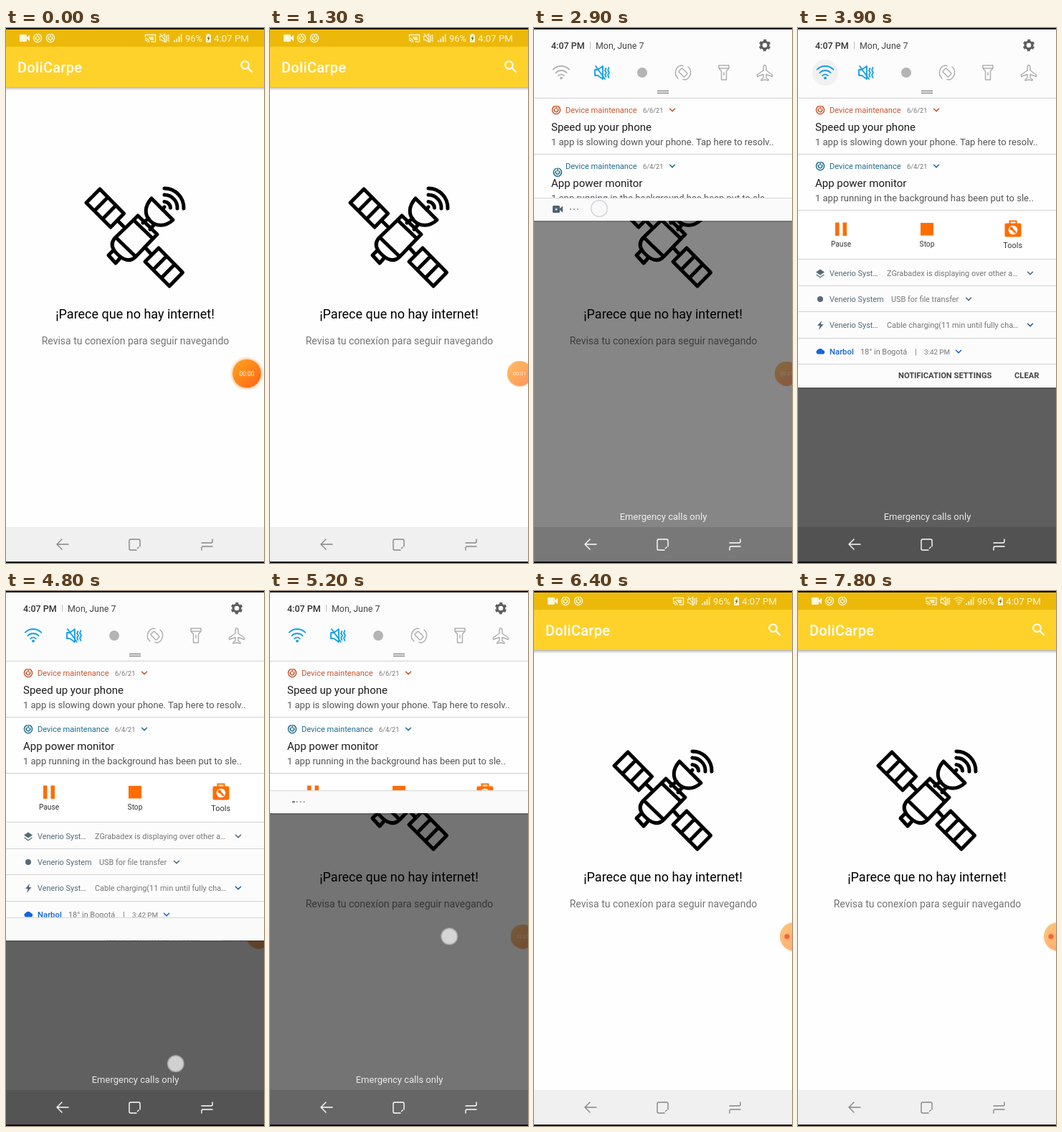
An HTML page for the animation above (8 s loop, 360 by 744 pixels).

```html
<!DOCTYPE html>
<html lang="es">
<head>
<meta charset="utf-8">
<title>Sin internet</title>
<style>
@property --h { syntax: '<number>'; inherits: true; initial-value: 0; }

html, body { margin: 0; width: 100%; height: 100%; overflow: hidden; background: #000; }
#stage {
  position: relative; width: 360px; height: 744px; overflow: hidden; background: #fefefe;
  font-family: Roboto, 'Open Sans', sans-serif;
  animation: pull 8s linear infinite;
  --dim: clamp(0, min((var(--h) - 100) * .0028, .407 + var(--h) * .000447), 1);
  --cam: clamp(0, (322 - var(--h)) / 50, 1);
  --blue: clamp(0, (250 - var(--h)) / 50, 1);
  --red: clamp(0, (150 - var(--h)) / 50, 1);
}
svg { position: absolute; left: 0; top: 0; display: block; }
.line { fill: none; stroke: currentColor; stroke-linecap: round; stroke-linejoin: round; }
.mid { text-anchor: middle; }
.md { font-weight: 500; }

/* height of the notification panel drives everything tied to it */
@keyframes pull {
  0%, 33.1% { --h: 0; }
  33.75% { --h: 40; }
  35% { --h: 150; }
  36.25% { --h: 267; }
  37.5% { --h: 370; }
  38.75% { --h: 450; }
  41.25%, 59.4% { --h: 499.5; }
  62.5% { --h: 430; }
  63.75% { --h: 375; }
  65% { --h: 310; }
  66.25% { --h: 237; }
  67.5% { --h: 165; }
  68.75% { --h: 100; }
  70% { --h: 45; }
  71.25% { --h: 10; }
  72.5%, 100% { --h: 0; }
}

/* recorder bubble */
#bubble { animation: dock 8s linear infinite; }
#disc { animation: fade 8s linear infinite; }
#halo { animation: halo 8s linear infinite; }
#zero { animation: zero 8s step-end infinite; }
#one { animation: one 8s step-end infinite; }
#dot { animation: dot 8s step-end infinite; }
@keyframes dock {
  0%, 12.5% { transform: translate(336px, 480.5px) scale(1); }
  17.5%, 65.6% { transform: translate(352.5px, 480.5px) scale(.85); }
  68.1%, 100% { transform: translate(363px, 480.5px) scale(1); }
}
@keyframes fade { 0%, 12.5% { opacity: 1; } 17.5%, 100% { opacity: .6; } }
@keyframes halo { 0%, 12.5% { opacity: 1; } 16%, 100% { opacity: 0; } }
@keyframes zero { 0% { opacity: 1; } 11.25%, 100% { opacity: 0; } }
@keyframes one { 0% { opacity: 0; } 11.25% { opacity: .8; } 66.25%, 100% { opacity: 0; } }
@keyframes dot { 0% { opacity: 0; } 66.25%, 100% { opacity: 1; } }

/* status bar */
#left { animation: left 8s step-end infinite; }
#net { animation: net 8s step-end infinite; }
@keyframes left { 0% { transform: none; } 95%, 100% { transform: translateX(-15.5px); } }
@keyframes net { 0% { opacity: 0; } 95%, 100% { opacity: .9; } }

/* shade and system buttons */
#dim { position: absolute; inset: 0; background: #000; opacity: var(--dim); }
#navdim { opacity: calc(var(--dim) * .12); }
#dark { color: #858585; opacity: calc(1 - clamp(0, var(--h) / 80, 1)); }
#light { color: #fff; opacity: clamp(0, (var(--h) - 85) / 60, 1); }
#calls { opacity: clamp(0, (var(--h) - 120) / 120, .85); }

/* notification panel */
#panel {
  position: absolute; left: 0; top: 0; width: 360px; height: calc(var(--h) * 1px);
  overflow: hidden; background: #fcfcfc;
}
#edge {
  position: absolute; left: 0; top: 0; width: 360px; height: 3px;
  background: linear-gradient(rgba(0,0,0,.2), rgba(0,0,0,0));
  transform: translateY(calc(var(--h) * 1px)); opacity: clamp(0, var(--h), 1);
}
#sheet { transform: translateY(calc(min(0, var(--h) - 128) * 1px)); }
#shelf { transform: translateY(calc(var(--h) * 1px - 16px)); opacity: clamp(0, (499 - var(--h)) / 10, 1); }
#s1 { transform: translateX(33px) scale(calc(var(--red) * .8)); }
#s2 { transform: translateX(calc((33 + 18 * var(--red)) * 1px)) scale(var(--blue)); }
#s3 { transform: translateX(calc((33 + 18 * (var(--red) + var(--blue))) * 1px)) scale(var(--cam)); }
#s4 {
  transform: translateX(calc((38 + 18 * (var(--red) + var(--blue) + var(--cam))) * 1px));
  opacity: clamp(0, (480 - var(--h)) / 30, 1);
}
#row2 {
  --s: clamp(0, (309 - var(--h)) / 43, 1);
  transform: translate(calc(31px + var(--s) * 2px), calc(192px + var(--s) * 9px));
}
#wifi { animation: wifi 8s step-end infinite; }
#ripple { transform-origin: 38px 62px; animation: ripple 8s linear infinite; }
@keyframes wifi { 0% { color: #b4b4b4; } 47.5%, 100% { color: #17a0e8; } }
@keyframes ripple {
  0%, 46.2% { opacity: 0; transform: scale(.5); }
  47.5%, 49.5% { opacity: 1; transform: scale(1); }
  52.5%, 100% { opacity: 0; transform: scale(1); }
}

/* finger marks */
#touch { animation: touch 8s linear infinite; }
#touch .fill { animation: press 8s linear infinite; }
@keyframes touch {
  0%, 27.4% { opacity: 0; transform: translate(184px, 130px); }
  27.5% { opacity: .5; transform: translate(184px, 130px); }
  30% { opacity: .35; transform: translate(191px, 245px); }
  31.3% { opacity: 0; transform: translate(193px, 262px); }
  33.3% { opacity: 0; transform: translate(96px, 8px); }
  33.75% { opacity: .7; transform: translate(95px, 24px); }
  36.25% { opacity: .7; transform: translate(91px, 250px); }
  38.75% { opacity: .7; transform: translate(88px, 434px); }
  40% { opacity: 0; transform: translate(87px, 470px); }
  45.5% { opacity: 0; transform: translate(38px, 62px); }
  46.25%, 47.2% { opacity: .7; transform: translate(38px, 62px); }
  48.5% { opacity: 0; transform: translate(38px, 62px); }
  58% { opacity: 0; transform: translate(236px, 671px); }
  59.4% { opacity: .75; transform: translate(236px, 671px); }
  62.5% { opacity: .75; transform: translate(240px, 602px); }
  65% { opacity: .75; transform: translate(250px, 481px); }
  68.75% { opacity: .6; transform: translate(318px, 279px); }
  70%, 100% { opacity: 0; transform: translate(330px, 240px); }
}
@keyframes press { 0%, 66% { opacity: 1; } 68.5%, 100% { opacity: 0; } }
</style>
</head>
<body>
<div id="stage">

<svg width="360" height="744">
  <defs>
    <linearGradient id="orange" x1="0" y1="0" x2="1" y2="1">
      <stop offset="0" stop-color="#ffa51f"/><stop offset="1" stop-color="#ff6414"/>
    </linearGradient>
    <linearGradient id="drop" x1="0" y1="0" x2="0" y2="1">
      <stop offset="0" stop-color="#000" stop-opacity=".28"/><stop offset="1" stop-color="#000" stop-opacity="0"/>
    </linearGradient>
    <g id="video" fill="currentColor">
      <rect x="-7" y="-5" width="10" height="10" rx="1.5"/>
      <path d="M2 0L7 -4.5V4.5Z"/>
      <circle cx="-2" r="1.6" fill="#fff" fill-opacity=".75"/>
    </g>
    <g id="swirl" class="line" stroke-width="1.5">
      <path d="M-2 -5.2A5.600 5.600 0 1 0 2 -5.200"/>
      <path d="M-2.2 -1.6A2.7 2.7 0 1 0 2.2 -1.6M0 -5.5V-1.5"/>
    </g>
    <g id="fan" class="line" stroke-width="1.9">
      <path d="M-11.300 -4.300A16 16 0 0 1 11.300 -4.300M-7.500 .2A10.500 10.500 0 0 1 7.500 .2M-3.8 4.200A5.3 5.3 0 0 1 3.8 4.200"/>
      <circle cy="7.600" r="1" fill="currentColor"/>
    </g>
    <g id="mute" class="line" stroke-width="1.9">
      <path d="M-10 -4H-6L1 -9V9L-6 4H-10ZM-9 -9L4 9M5.5 -6L4 -3 6 0 4 3 5.5 6M9.5 -7L8 -3.5 10 0 8 3.5 9.5 7"/>
    </g>
    <path id="chev" class="line" stroke-width="1.6" d="M-3.5 -1.7L0 1.8L3.5 -1.7"/>
    <g id="nav" class="line" stroke-width="1.4">
      <path d="M87 718H71.500M78 711L71 718L78 725"/>
      <path d="M182 726H174Q172 726 172 724V713Q172 711 174 711H185Q187 711 187 713V721M183.500 723.500L185 722"/>
      <path d="M288 711V714Q288 716 286 716H273M273 726V723Q273 721 275 721H288"/>
    </g>
    <path id="wing" d="M131 224L164.500 258L146 277L112 243ZM142.200 235.300L123.300 254.300M153.300 246.700L134.700 265.700"/>
  </defs>

  <!-- app bar -->
  <rect y="82" width="360" height="5" fill="url(#drop)"/>
  <rect width="360" height="27" fill="#ecb90a"/>
  <rect y="26" width="360" height="56" fill="#ffd12b"/>
  <text class="md" x="16" y="62" font-size="20" letter-spacing=".3" fill="#fff">DoliCarpe</text>
  <g class="line" color="#fff" stroke-width="2.1">
    <circle cx="333.500" cy="51.500" r="5.300"/><path d="M337.500 55.500L343 61"/>
  </g>

  <!-- status bar -->
  <g color="#fff6d6" fill="#fff6d6" font-size="13.3">
    <use href="#video" x="26" y="14"/>
    <use href="#swirl" x="44" y="14"/>
    <use href="#swirl" x="62" y="14"/>
    <g id="left">
      <path class="line" stroke-width="1.4" d="M194.500 12V9.500H208.500V19H203M194.500 14.200A5 5 0 0 1 199.500 19M194.500 16.700A2.400 2.400 0 0 1 197 19"/>
      <path d="M198 12H206V17H202Z" opacity=".8"/>
      <use href="#mute" transform="translate(221 14) scale(.64)"/>
    </g>
    <g id="net"><use href="#fan" transform="translate(224.500 14) scale(.57)"/></g>
    <path d="M234 17H236V19.500H234ZM237.300 14.500H239.300V19.500H237.300ZM240.600 11.500H242.600V19.500H240.600ZM243.900 8.500H245.500V19.500H243.900Z" opacity=".9"/>
    <text x="250" y="19" font-size="12.8">96%</text>
    <path d="M279 9.500H281V8H284V9.500H286V20H279Z"/>
    <path d="M283.500 10.500L280.500 15H282.200L281.500 18.500L284.700 13.800H283Z" fill="#8a6c00"/>
    <text x="290" y="19">4:07 PM</text>
  </g>

  <!-- satellite -->
  <g class="line" color="#000" stroke-width="5">
    <use href="#wing"/>
    <use href="#wing" x="82" y="82"/>
    <path d="M156 268L165 277M194 305L203 315"/>
    <path d="M184 261L211 287L205 293L178 267Z"/>
    <path d="M178 267L152 292C145 300 148 308 157 316C166 324 174 325 181 318L205 293M153 291L181 318"/>
    <path d="M150 309L143 316L153 327L160 319"/>
    <path d="M203 237C193 248 193 260 201 268C209 276 222 277 233 267Z"/>
    <path d="M199 265L191 271M207 273L201 280"/>
    <path d="M218 252L221 249"/>
    <path d="M221 223A27 27 0 0 1 248 251M221 232A18 18 0 0 1 239 251M221 241.500A9 9 0 0 1 229.500 250"/>
  </g>
  <text class="mid" x="180" y="404" font-size="18" fill="#000">¡Parece que no hay internet!</text>
  <text class="mid" x="180.500" y="440" font-size="14" fill="#757575">Revisa tu conexíon para seguir navegando</text>

  <rect y="694" width="360" height="50" fill="#f0f0f0"/>
  <use id="dark" href="#nav"/>

  <g id="bubble">
    <circle id="halo" r="23" fill="#fbe6d8"/>
    <g id="disc"><circle r="20" fill="url(#orange)"/></g>
    <g class="mid" font-size="8.500" fill="#fff">
      <text id="zero" y="3">00:00</text>
      <text id="one" y="3">00:01</text>
    </g>
    <circle id="dot" cx="-10" r="3.600" fill="#f2603e"/>
  </g>
</svg>

<div id="dim"></div>

<svg width="360" height="744">
  <rect id="navdim" y="694" width="360" height="50"/>
  <use id="light" href="#nav"/>
  <text id="calls" class="mid" x="180.500" y="684" font-size="13" fill="#fff">Emergency calls only</text>
</svg>

<div id="edge"></div>
<div id="panel">
<svg width="360" height="500">
  <g id="sheet">
    <rect y="98" width="360" height="155" fill="#fefefe"/>
    <rect y="254" width="360" height="67" fill="#fff"/>
    <path d="M0 97.500H360M0 175.500H360M0 253.500H360M0 321.500H360M0 358.500H360M0 394.500H360M0 431.500H360M0 467.500H360" stroke="#d2d2d2"/>

    <!-- quick settings -->
    <text class="md" x="24" y="29" font-size="12.500" fill="#333">4:07 PM</text>
    <path d="M78.500 19V29" stroke="#bbb"/>
    <text x="86" y="29" font-size="12.400" fill="#444">Mon, June 7</text>
    <g fill="none" stroke="#5c5c5c">
      <circle cx="322" cy="24" r="4.900" stroke-width="3.200"/>
      <circle cx="322" cy="24" r="7" stroke-width="2.400" stroke-dasharray="3.800 3.530" transform="rotate(15 322 24)"/>
    </g>
    <circle id="ripple" cx="38" cy="62" r="18" fill="#f1f1f1"/>
    <g id="wifi"><use href="#fan" x="38" y="62"/></g>
    <use href="#mute" x="95" y="62" color="#17a0e8"/>
    <circle cx="151" cy="62" r="7" fill="#b4b4b4"/>
    <g class="line" color="#b0b0b0" stroke-width="1.500">
      <rect x="204.500" y="56.500" width="7" height="11" rx="1.200" transform="rotate(-45 208 62)"/>
      <path d="M201 70A10.500 10.500 0 0 1 205 52M215 54A10.500 10.500 0 0 1 211 72M205 52L208 52.500M211 72L208 71.500"/>
      <path d="M258 52H272V56L268.500 60V72H261.500V60L258 56ZM258 56H272M265 62V65.500"/>
      <path d="M322 51.500Q324 52 324 55V59L332.500 65V67.500L324 64.500V69L327 71.500V73L322 71.700L317 73V71.500L320 69V64.500L311.500 67.500V65L320 59V55Q320 52 322 51.500Z"/>
    </g>
    <path d="M172 87.500H188M172 90.500H188" stroke="#8c8c8c" stroke-width="1.300"/>

    <!-- notifications -->
    <g color="#c5542c" fill="#c5542c">
      <use href="#swirl" x="31" y="114"/>
      <text x="44" y="118" font-size="11.100">Device maintenance</text>
      <use href="#chev" x="193" y="114"/>
    </g>
    <g color="#1d6c90" fill="#1d6c90">
      <use id="row2" href="#swirl"/>
      <text x="44" y="196" font-size="11.100">Device maintenance</text>
      <use href="#chev" x="193" y="192"/>
    </g>
    <g font-size="9.300" fill="#777">
      <text x="152" y="118">6/6/21</text><text x="152" y="196">6/4/21</text>
    </g>
    <g font-size="15" fill="#1c1c1c">
      <text x="24" y="143">Speed up your phone</text><text x="24" y="221">App power monitor</text>
    </g>
    <g font-size="13" fill="#555">
      <text x="24" y="163">1 app is slowing down your phone. Tap here to resolv..</text>
      <text x="24" y="241">1 app running in the background has been put to sle..</text>
    </g>

    <!-- recorder controls -->
    <g fill="#ff6d00">
      <path d="M52 270.500H57.500V289H52ZM62.500 270.500H68V289H62.500Z"/>
      <rect x="171" y="271" width="18" height="17.500"/>
      <rect x="288.500" y="271.500" width="23" height="19" rx="2"/>
      <path d="M295.500 272V268.500H304.500V272" fill="none" stroke="#ff6d00" stroke-width="2"/>
    </g>
    <circle cx="300" cy="281" r="6.300" fill="#fff"/>
    <path d="M298 279L303 284" stroke="#ff6d00" stroke-width="2.600" stroke-linecap="round"/>
    <circle cx="297.800" cy="278.800" r="2.300" fill="#ff6d00"/>
    <g class="mid" font-size="10.200" fill="#333">
      <text x="60" y="304">Pause</text><text x="180" y="304">Stop</text>
      <text x="299.700" y="306" font-size="10.900">Tools</text>
    </g>

    <!-- system rows -->
    <g fill="#546a78" color="#546a78" font-size="10.900">
      <path d="M31 335.500L37 339.500L31 343.500L25 339.500ZM26 342.500L31 346L36 342.500L37 343.300L31 347.500L25 343.300Z"/>
      <circle cx="31" cy="377" r="4"/>
      <path d="M33 407L27 414H30.500L29 420L35.500 412H31.800Z"/>
      <text x="44" y="345">Venerio Syst…</text>
      <text x="44" y="381">Venerio System</text>
      <text x="44" y="417">Venerio Syst…</text>
      <use href="#chev" x="324" y="341"/>
      <use href="#chev" x="238" y="377"/>
      <use href="#chev" x="324" y="413" color="#1d5f9a"/>
    </g>
    <g fill="#777" font-size="10.900">
      <text x="124" y="345">ZGrabadex is displaying over other a…</text>
      <text x="130" y="381">USB for file transfer</text>
      <text x="124" y="417">Cable charging(11 min until fully cha…</text>
      <text x="87" y="454">18° in Bogotá</text>
      <text x="163" y="454">|</text>
      <text x="176" y="454" font-size="9.800">3:42 PM</text>
    </g>
    <g fill="#1565d8" color="#1565d8">
      <path d="M27.500 453.500A3.200 3.200 0 0 1 27.500 447.500A4.500 4.500 0 0 1 35 448A2.900 2.900 0 0 1 35.500 453.500Z"/>
      <text class="md" x="44" y="454" font-size="11.300">Narbol</text>
      <use href="#chev" x="224" y="450"/>
    </g>
    <g font-size="11.200" font-weight="700" fill="#444">
      <text x="140" y="487">NOTIFICATION SETTINGS</text><text x="302" y="487">CLEAR</text>
    </g>
  </g>

  <g id="shelf">
    <rect y="-16" width="360" height="32" fill="#fafafa"/>
    <path d="M0 -15.500H360" stroke="#d4d4d4"/>
    <use id="s1" href="#swirl" color="#c5542c"/>
    <use id="s2" href="#swirl" color="#1d6c90"/>
    <use id="s3" href="#video" color="#4c6270"/>
    <g id="s4" fill="#8a8a8a"><circle cx="-5" r="1"/><circle r="1"/><circle cx="5" r="1"/></g>
  </g>
</svg>
</div>

<svg width="360" height="744">
  <g id="touch">
    <circle class="fill" r="11" fill="#f6f6f6"/>
    <circle r="11.300" fill="none" stroke="#bcbcc8" stroke-width="1.300"/>
  </g>
  <path d="M0 0H360V2H0ZM0 742H360V744H0Z" fill="#0c0c0c"/>
</svg>

</div>
</body>
</html>
```
